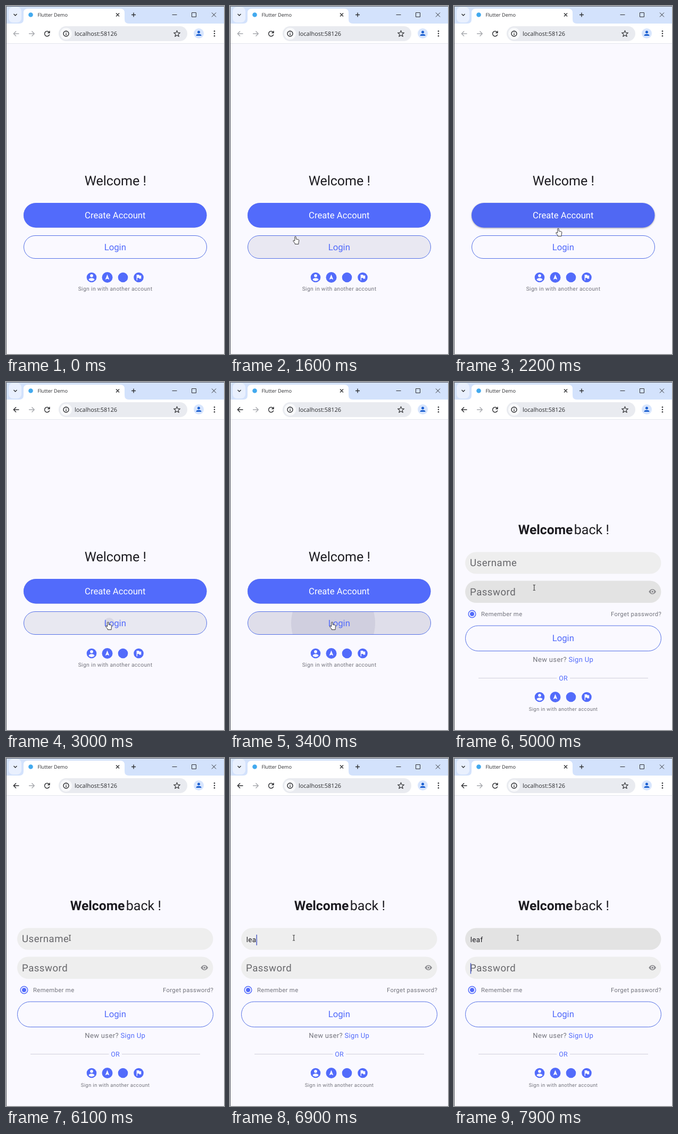
Recreate the animation shown at these times as an HTML page. Size 410x654 px, loop 8 s.

```html
<!DOCTYPE html>
<html lang="en">
<head>
<meta charset="utf-8">
<title>Sign-in flow</title>
<style>
  html, body { margin: 0; width: 100%; height: 100%; overflow: hidden; background: #faf9ff; }
  svg { display: block; text-rendering: geometricPrecision; }
  text { font-family: Roboto, sans-serif; fill: #1c1b20; }
  .ui { font-family: "Open Sans", sans-serif; fill: #2a2b2e; }
  .mid { text-anchor: middle; }
  .blue { fill: #526bfb; }
  .grey { fill: #73747c; letter-spacing: .35px; }
  .hint { font-size: 18.6px; letter-spacing: .5px; fill: #67676b; }
  .head { font-size: 25px; }
  .btn { font-size: 16.7px; }
  .line { fill: none; stroke: #2f3033; stroke-width: 1.4; }
  .pill { fill: none; stroke: #5470e6; }
</style>
</head>
<body>
<svg width="410" height="654" viewBox="0 0 410 654">
  <defs>
    <clipPath id="loginClip"><rect x="34" y="432" width="343" height="42" rx="21"/></clipPath>
    <g id="social">
      <g class="blue">
        <circle cx="161" r="9.3"/><circle cx="190.5" r="10"/>
        <circle cx="220" r="9.3"/><circle cx="249.5" r="9.3"/>
      </g>
      <g fill="#faf9ff">
        <circle cx="161" cy="-3.2" r="2.9"/>
        <path d="M155.3 4.2Q156.5 1.2 161 1.2T166.7 4.2Q164.700 7 161 7T155.300 4.200z"/>
        <path d="M190.500-5.500L194.300 4.300L190.500 2.600L186.700 4.300z"/>
        <path d="M245.600-5H250.200L250.700-3.600H254.300V2.400H250.500L250 1H247V5.500H245.600z"/>
      </g>
    </g>
  </defs>

  <rect width="410" height="654" fill="#faf9ff"/>

  <g id="browser">
    <rect width="410" height="40" fill="#d3e2fc"/>
    <rect x="5" y="2" width="24" height="29" rx="8" fill="#e9f0fe"/>
    <path d="M25 33Q33 33 33 25V13Q33 5 41 5H215Q223 5 223 13V25Q223 33 231 33H410V71H0V33z" fill="#fff"/>
    <path d="M0 70.500H410" stroke="#e3e5ec"/>
    <circle cx="46.500" cy="16.500" r="4.300" fill="#42a9ee"/>
    <text class="ui" x="59.500" y="20" font-size="9.200">Flutter Demo</text>
    <rect x="99" y="38" width="242" height="28" rx="14" fill="#e9ebf0"/>
    <circle cx="113" cy="52" r="11" fill="#f9fafc"/>
    <text class="ui" x="129" y="56" font-size="10.950">localhost:58126</text>
    <path class="line" d="M14.500 15L17.500 18L20.500 15M207 13.500L213 19.500M213 13.500L207 19.500M236 16.500H244M240 12.500V20.500"/>
    <path class="line" style="stroke-width:1" d="M312.500 16.500H321.500M349.500 12.500H357.500V20.500H349.500zM387 12.500L395 20.500M395 12.500L387 20.500"/>
    <path id="back" class="line" d="M24.500 52H14.500M19 47.300L14.300 52L19 56.700"/>
    <path class="line" style="stroke:#a7a9ae" d="M43 52H53M48.500 47.300L53.200 52L48.500 56.700"/>
    <path class="line" d="M81.500 50A4.700 4.700 0 1 0 81.800 53.500M82 46.800V50.500H78.300"/>
    <circle class="line" cx="113" cy="52" r="5"/>
    <path class="line" d="M113 51.300V55M113 48.700V50"/>
    <path id="star" class="line" style="stroke-width:1.200" stroke-linejoin="round"/>
    <circle cx="362.500" cy="51.500" r="9.500" fill="#d7e5fd"/>
    <g fill="#1a5fd0"><circle cx="362.500" cy="49" r="2.500"/><path d="M357.500 56Q357.500 52.700 362.500 52.700T367.500 56z"/></g>
    <g fill="#2f3033"><circle cx="392" cy="47.300" r="1.250"/><circle cx="392" cy="51.800" r="1.250"/><circle cx="392" cy="56.300" r="1.250"/></g>
  </g>

  <g id="welcome">
    <text class="head mid" x="205.800" y="336.500">Welcome !</text>
    <rect id="create" class="blue" x="33" y="370" width="344.500" height="46.500" rx="23.200"/>
    <text class="btn mid" x="205.300" y="398.500" style="fill:#fff">Create Account</text>
    <g clip-path="url(#loginClip)" fill="#1a1a50">
      <rect id="tint" x="33" y="431" width="345" height="44"/>
      <circle id="ripple" cx="194" cy="453" opacity=".07"/>
    </g>
    <rect class="pill" x="33.500" y="431.500" width="344" height="43" rx="21.500"/>
    <text class="btn mid blue" x="205.300" y="458.500">Login</text>
    <use href="#social" y="510"/>
    <text class="grey mid" x="205.500" y="535" font-size="10.300">Sign in with another account</text>
  </g>

  <g id="signin">
    <text class="head" x="120.700" y="286" style="font-weight:700;font-size:24.700px">Welcome</text>
    <text class="head" x="225.800" y="286">back !</text>
    <rect id="userBox" x="21" y="319.500" width="368.500" height="41" rx="20.500"/>
    <rect id="passBox" x="21" y="373.500" width="368.500" height="41.500" rx="20.700"/>
    <text id="userHint" class="hint" x="30" y="346">Username</text>
    <text id="typed" x="30.700" y="346" font-size="13.300" letter-spacing=".4"></text>
    <text class="hint" x="30" y="400.500">Password</text>
    <rect id="caret" width="1.500" height="20" fill="#4f5fc4"/>
    <path d="M366.300 394Q369 389.300 373.200 389.300T380.100 394Q377.400 398.700 373.200 398.700T366.300 394z" fill="#8b8b8f"/>
    <circle cx="373.200" cy="394" r="2.500" fill="#8b8b8f" stroke="#eee" stroke-width="1.300"/>
    <circle cx="34" cy="436" r="6.800" fill="none" stroke="#526bfb" stroke-width="1.500"/>
    <circle class="blue" cx="34" cy="436" r="4"/>
    <text class="grey" x="51" y="440.300" font-size="11.300">Remember me</text>
    <text class="grey" x="295" y="440.300" font-size="11.300">Forget password?</text>
    <rect class="pill" x="21.500" y="458" width="368" height="47.500" rx="23.700"/>
    <text class="btn mid blue" x="205.300" y="487">Login</text>
    <text class="grey" x="148.300" y="526" font-size="13">New user?</text>
    <text class="blue" x="215.500" y="526" font-size="13" letter-spacing=".35">Sign Up</text>
    <path d="M46 556.500H193.500M218 556.500H365" stroke="#cfcfdb"/>
    <text class="mid blue" x="205.500" y="561" font-size="12.500">OR</text>
    <use href="#social" y="592"/>
    <text class="grey mid" x="205.500" y="617.500" font-size="9.500">Sign in with another account</text>
  </g>

  <g id="cursor" stroke-linejoin="round">
    <path id="arrow" d="M0 0V11.200L2.600 8.800L4.400 12.700L6 12L4.300 8.200H7.800z" fill="#fff" stroke="#222" stroke-width=".9"/>
    <path id="hand" d="M-1.200 8.500V.8Q0-.8 1.200.8V5L5.500 5.800Q7 6.200 6.800 8L6 12V14.500H-.8V13L-4.200 9Q-4.300 7.200-2.800 7.500z" fill="#fff" stroke="#222" stroke-width=".9"/>
    <path id="beam" d="M-2-5H-.5L0-4.500L.5-5H2M0-4.500V4.500M-2 5H-.5L0 4.500L.5 5H2" fill="none" stroke="#222"/>
  </g>

  <path d="M.5 654V.5H410" fill="none" stroke="#55575f"/>
</svg>
<script>
const LOOP = 8000, STEP = 100, WORD = "leaf", KEYS = [6400, 6800, 6900, 7100];
const PATH = [[1400, 108, 464], [1600, 123, 433], [1700, 123, 433], [2000, 172, 402], [2200, 196, 418],
  [2600, 192, 451], [4600, 192, 451], [5300, 120, 338]];
const RIPPLE = [[2900, 0], [3100, 20], [3200, 20], [3400, 79]];
const PRESS = [[2900, .07], [3100, .085], [3200, .085], [3400, .12]];

const $ = id => document.getElementById(id);
const set = (id, attrs) => { for (const k in attrs) $(id).setAttribute(k, attrs[k]); };
const show = (id, on) => { $(id).style.display = on ? "" : "none"; };
const within = (v, a, b) => v >= a && v < b;

// Linear interpolation through [time, ...values] rows, held at both ends
function track(rows, t, col = 1) {
  const i = rows.findIndex(r => r[0] > t);
  if (i < 0) return rows[rows.length - 1][col];
  if (!i) return rows[0][col];
  const a = rows[i - 1], b = rows[i];
  return a[col] + (b[col] - a[col]) * (t - a[0]) / (b[0] - a[0]);
}

function starPath(cx, cy) {
  const points = Array.from({ length: 10 }, (_, i) => {
    const r = i % 2 ? 2.7 : 6.2, a = (i / 5 - .5) * Math.PI;
    return (cx + r * Math.cos(a)).toFixed(2) + " " + (cy + r * Math.sin(a)).toFixed(2);
  });
  return "M" + points.join("L") + "z";
}

function render(t) {
  const x = track(PATH, t, 1), y = track(PATH, t, 2);
  const second = t >= 3700;
  show("welcome", !second);
  show("signin", second);
  $("back").style.stroke = t >= 3000 ? "#2f3033" : "#a7a9ae";

  const visible = t >= 1400;
  const onCreate = visible && y < 419, onLogin = visible && within(y, 431, 475);
  $("create").style.filter = onCreate
    ? "drop-shadow(0 1.5px 1.5px rgba(0,0,0,.35)) brightness(.97)"
    : "drop-shadow(0 .7px .7px rgba(0,0,0,.25))";
  set("tint", { opacity: onLogin ? track(PRESS, t) : 0 });
  set("ripple", { r: track(RIPPLE, t) });

  const onUser = within(y, 319, 361), onPass = within(y, 373, 416);
  const userFocus = within(t, 5700, 7900), passFocus = t >= 7900;
  set("userBox", { fill: onUser && !userFocus ? "#e3e3e3" : "#eee" });
  set("passBox", { fill: onPass ? "#e3e3e3" : "#eee" });

  const count = KEYS.filter(k => t >= k).length;
  $("typed").textContent = WORD.slice(0, count);
  show("userHint", !count);
  show("caret", within(t, 5700, 6000) || within(t, 6400, 7600) || passFocus);
  const typedWidth = count && second ? $("typed").getComputedTextLength() : 0;
  set("caret", passFocus ? { x: 30.7, y: 385.5 } : { x: 30.7 + typedWidth, y: 332 });

  const kind = second ? (onUser || onPass ? "beam" : "arrow") : (onCreate || onLogin ? "hand" : "arrow");
  for (const id of ["arrow", "hand", "beam"]) show(id, visible && id === kind);
  set("cursor", { transform: `translate(${x} ${y})` });
}

set("star", { d: starPath(321.5, 52.3) });

function tick() {
  const t = performance.now() % LOOP;
  render(Math.floor(t / STEP) * STEP);
  requestAnimationFrame(tick);
}
tick();
</script>
</body>
</html>
```
